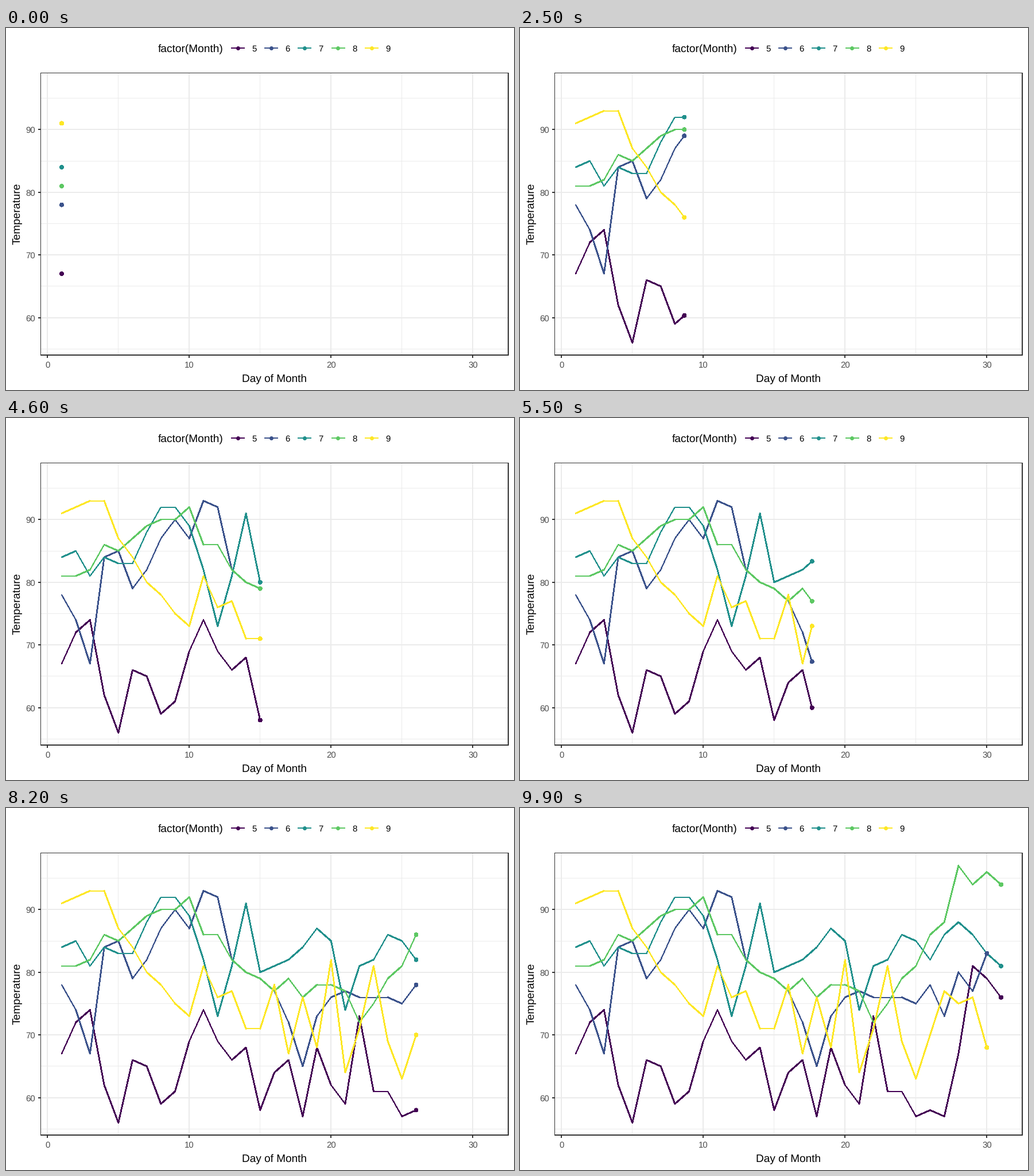
These frames come from a looping animation (885 by 632 pixels, 10000 ms). A matplotlib script:

```python
import numpy as np
import matplotlib.pyplot as plt
from matplotlib.animation import FuncAnimation
from matplotlib.collections import LineCollection
from matplotlib.patches import Rectangle

W, H, DPI = 885, 632, 64
PX = 72 / DPI  # points per pixel
FRAMES, DAYS = 100, 31

GRID, BORDER, TICK_TEXT = "#EBEBEB", "#333333", "#4D4D4D"
LEFT, TOP, RIGHT, BOTTOM = 60, 78, 876, 572

plt.rcParams["font.family"] = "Liberation Sans"
plt.rcParams["text.hinting"] = "none"

fig = plt.figure(figsize=(W / DPI, H / DPI), dpi=DPI, facecolor="white")
ax = fig.add_axes([0, 0, 1, 1])
ax.set_xlim(0, W)
ax.set_ylim(H, 0)
ax.axis("off")


def px(day):
    return 72.3 + 24.7 * day


def py(temp):
    return 177.4 + 10.94 * (90 - temp)


def box(x, y, w, h, color, z=1):
    ax.add_patch(Rectangle((x, y), w, h, fc=color, lw=0, antialiased=False, zorder=z))


def label(x, y, text, size, color="black", **kw):
    ax.text(x, y, text, fontsize=size * PX, color=color, va="baseline", zorder=6, **kw)


def dots(x, y, colors, z):
    return ax.scatter(x, y, s=(7 * PX) ** 2, c=colors, linewidths=0,
                      antialiased=False, zorder=z)


months = []


def add_month(name, color, temps):
    months.append((name, color, np.array(temps)))


add_month("5", "#440154", [67, 72, 74, 62, 56, 66, 65, 59, 61, 69, 74, 69, 66, 68, 58, 64,
                           66, 57, 68, 62, 59, 73, 61, 61, 57, 58, 57, 67, 81, 79, 76])
add_month("6", "#3B528B", [78, 74, 67, 84, 85, 79, 82, 87, 90, 87, 93, 92, 82, 80, 79, 77,
                           72, 65, 73, 76, 77, 76, 76, 76, 75, 78, 73, 80, 77, 83])
add_month("7", "#21908C", [84, 85, 81, 84, 83, 83, 88, 92, 92, 89, 82, 73, 81, 91, 80, 81,
                           82, 84, 87, 85, 74, 81, 82, 86, 85, 82, 86, 88, 86, 83, 81])
add_month("8", "#5DC863", [81, 81, 82, 86, 85, 87, 89, 90, 90, 92, 86, 86, 82, 80, 79, 77,
                           79, 76, 78, 78, 77, 72, 75, 79, 81, 86, 88, 97, 94, 96, 94])
add_month("9", "#FDE725", [91, 92, 93, 93, 87, 84, 80, 78, 75, 73, 81, 76, 77, 71, 71, 78,
                           67, 76, 68, 82, 64, 71, 81, 69, 63, 70, 77, 75, 76, 68])
colors = [color for _, color, _ in months]

# Grid: minor lines are one pixel wide, major lines two
for day in (5, 15, 25):
    box(int(px(day)), TOP, 1, BOTTOM - TOP, GRID)
for temp in range(55, 100, 10):
    box(LEFT, int(py(temp)), RIGHT - LEFT, 1, GRID)
for day in (0, 10, 20, 30):
    x = round(px(day))
    box(x - 1, TOP, 2, BOTTOM - TOP, GRID, 1.5)
    box(x - 1, BOTTOM, 2, 4, BORDER)
    label(px(day), 592.4, str(day), 15, TICK_TEXT, ha="center")
for temp in (60, 70, 80, 90):
    y = round(py(temp))
    box(LEFT, y - 1, RIGHT - LEFT, 2, GRID, 1.5)
    box(LEFT - 4, y - 1, 4, 2, BORDER)
    label(51.3, py(temp) + 5.9, str(temp), 15, TICK_TEXT, ha="right")

# Panel border
box(LEFT, TOP, RIGHT - LEFT, 1, BORDER, 5)
box(LEFT, TOP, 1, BOTTOM - TOP, BORDER, 5)
box(RIGHT - 2, TOP, 2, BOTTOM - TOP, BORDER, 5)
box(LEFT, BOTTOM - 2, RIGHT - LEFT, 2, BORDER, 5)

label(467.5, 618, "Day of Month", 19, ha="center")
label(25, 324.5, "Temperature", 19.1, ha="center", rotation=90, rotation_mode="anchor")

# Legend
label(264.8, 42, "factor(Month)", 19.1)
for i, (name, color, _) in enumerate(months):
    x = 403.7 + 58.2 * i
    box(round(x - 11.7), 34, 24, 2, color, 2)
    dots([x], [34.7], [color], 3)
    label(x + 24.6, 40.9, name, 15)

lines = LineCollection([], capstyle="round", antialiaseds=False, zorder=3)
ax.add_collection(lines, autolim=False)
heads = dots([0] * 5, [0] * 5, colors, 4)

days = np.arange(1, DAYS + 1)
keys = [round((FRAMES - 1) * (d - 1) / (DAYS - 1)) for d in days]


def draw(n):
    now = np.interp(n, keys, days)
    segs, widths, hues, tips = [], [], [], []
    for _, color, temps in months:
        end = min(now, len(temps))
        for d in range(1, int(np.ceil(end))):
            a, b = temps[d - 1], temps[d]
            part = min(end - d, 1)
            segs.append([(px(d), py(a)), (px(d + part), py(a + (b - a) * part))])
            # Medium slopes come out as hairlines
            widths.append(PX * (1 if 3 <= abs(b - a) <= 5 else 1.8))
            hues.append(color)
        tips.append((px(end), py(np.interp(end, days[:len(temps)], temps))))
    lines.set_segments(segs)
    lines.set_linewidths(widths or [PX])
    lines.set_colors(hues or ["white"])
    heads.set_offsets(tips)
    return lines, heads


anim = FuncAnimation(fig, draw, frames=FRAMES, interval=100, repeat=True, repeat_delay=0)
plt.show()
```
